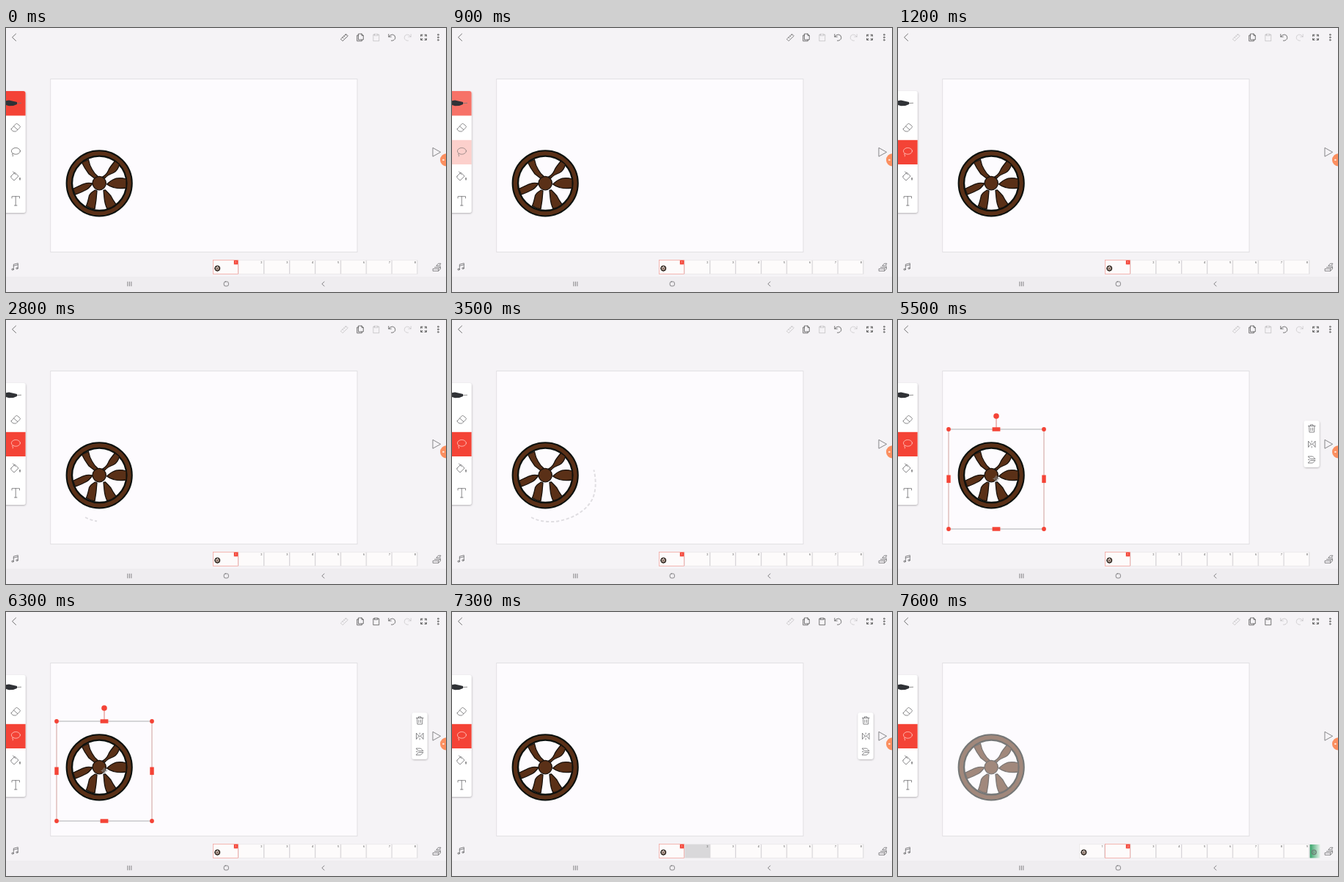
An HTML page for the animation above (8000 ms loop, 600 by 360 pixels).

```html
<!DOCTYPE html>
<html lang="en">
<head>
<meta charset="utf-8">
<title>Lasso tool</title>
<style>
html, body { margin: 0; width: 100%; height: 100%; overflow: hidden; background: #f5f3f6; }
svg { display: block; width: 100vw; height: 100vh; }
text { font: 4px Roboto, Arial, sans-serif; fill: #555; text-anchor: middle; }
.icon { fill: none; stroke: #555; stroke-width: .8; stroke-linejoin: round; stroke-linecap: round; }
.soft { stroke: #6c6c6f; }
.red { fill: #f44336; }
</style>
</head>
<body>
<svg viewBox="0 0 600 360">
  <defs>
    <filter id="shadow" x="-30%" y="-10%" width="160%" height="120%">
      <feDropShadow dx=".4" dy="1" stdDeviation="1.2" flood-opacity=".28"/>
    </filter>
    <linearGradient id="green">
      <stop offset="0" stop-color="#35a368"/>
      <stop offset="1" stop-color="#e6f3ea"/>
    </linearGradient>
    <clipPath id="stripClip"><rect x="240" y="310" width="321.5" height="28"/></clipPath>
    <path id="loop" d="M108 269C117 274 128 275.5 140 275C164 272 184 260 192 243C198 228 196 211 191 196C188 189 185 184 180 178C167 162 150 153 128 152.5C104 153 88 170 79 192C72 213 71 240 82 256C85 260 88 263 92 265"/>
    <mask id="loopMask" maskUnits="userSpaceOnUse" x="60" y="140" width="150" height="150">
      <use id="reveal" href="#loop" fill="none" stroke="#fff" stroke-width="6"/>
    </mask>
    <g id="wheel">
      <circle cx="127.2" cy="211.8" r="40.8" fill="none" stroke="#0c110e" stroke-width="9.6"/>
      <circle cx="127.2" cy="211.8" r="41" fill="none" stroke="#5a3017" stroke-width="5.2"/>
      <g fill="#5a3017" stroke="#17110c" stroke-width="1.3" stroke-linejoin="round">
        <path d="M103.500 183.500L112.500 179.500C113.500 185 115 189 117.500 193C119.500 197 122 200 126 203L121.500 205.500C118 203 115.500 201 113 199C110 195 106 189 103.500 183.500Z"/>
        <path d="M148.500 181.500L154.500 185.800C153.500 191 151 195 146.500 197.500C142 199 138 201 134.500 205L131.500 203C135.500 201 138 198 139.500 194.500C141.500 189.500 145 186 148.500 181.500Z"/>
        <path d="M164 206V218C158 219 152 219 147 217.500C143 216.500 140 215 137.500 213C140 211 142 208.500 145.500 207C151 204 157 204 164 206Z"/>
        <path d="M91.500 219.300C97 216.500 102 214 107 212.300C111 211 114 211 118 212C115.500 215.500 113 218.500 109.500 220.500C105 223 100 225 94.500 227.200Z"/>
        <path d="M121.500 221L124 222C123.500 231 122.500 239 121 247C117 246.500 113 245 109.500 242.500C111.500 238 112.500 233 113.500 228.500C115 225 118 223 121.500 221Z"/>
        <path d="M133 221.500L135.500 221C138 223.500 140.500 226 143 229C145 233 147.500 237 150 240.500C146.500 243.500 142.500 245.500 138 246.500C135.500 242 134.500 237 134 232Z"/>
        <circle cx="127.200" cy="211.600" r="9.200"/>
      </g>
    </g>
  </defs>

  <rect width="600" height="360" fill="#f5f3f6"/>
  <rect x="60.700" y="69.600" width="418.300" height="236" fill="#fdfbfe" stroke="#dfdde1" stroke-width=".9"/>
  <use href="#wheel" id="drawing"/>
  <g id="lasso" mask="url(#loopMask)">
    <use href="#loop" fill="none" stroke="#dfdde1" stroke-width="1.900" stroke-dasharray="4.200 2.800"/>
  </g>

  <g id="selection">
    <path d="M69 149H199M69 285H199" stroke="#a3a6a6" stroke-width=".9"/>
    <path d="M69 149V285M199 149V285" stroke="#cb9590" stroke-width=".9"/>
    <path d="M134 131V148" stroke="#e07a72"/>
    <g class="icon" style="stroke:#8d8d8d;stroke-width:.7">
      <circle cx="134" cy="216.500" r="2.600"/><path d="M129.800 216.500H138.200M134 212.300V220.700"/>
    </g>
    <g class="red" id="handles"></g>
  </g>

  <!-- tool bar -->
  <rect x="-6" y="86" width="32.600" height="166" rx="3" fill="#fff" filter="url(#shadow)"/>
  <path class="red" id="brushOn" d="M0 86H23.600Q26.600 86 26.600 89V119.500H0Z"/>
  <path class="red" id="lassoOn" d="M0 152.800H26.600V186H0Z"/>
  <path d="M0 99.200L4 98.500L15 101V104L10 106L4 106.300L0 105Z" fill="#303236"/>
  <path d="M15 102.600L21 102.300" stroke="#777" stroke-width=".8"/>
  <g class="icon soft">
    <path d="M7.300 137.500L13.500 130.700Q14.500 130 15.500 130.700L19 133.700Q20 134.700 19 135.700L13.500 141H10L7.300 138.800Q6.700 138.200 7.300 137.500ZM10.500 134L15.800 138.700"/>
    <g id="lassoIcon"><ellipse cx="13.400" cy="167.800" rx="6" ry="4.400"/><path d="M9.300 171Q7.800 172 9 173Q10.300 173.800 9.300 175"/></g>
    <path d="M7 202L12 197L17 202L12 207.200Q11 208 10 207.200L7.200 204.500Q6.200 203.300 7 202ZM9.500 195.800L13 200M19 204.300Q17.600 206.800 19 207.400Q20.400 206.800 19 204.300"/>
    <path d="M8 232V229.700H18.500V232M13.200 229.700V242M11.500 242H15"/>
  </g>

  <!-- top bar -->
  <circle id="ripple" cx="483" cy="12.500" r="11" fill="#d3d2d4"/>
  <g class="icon">
    <path d="M13.500 8L8.500 12.700L13.500 17.500"/>
    <path id="ruler" d="M456.700 14.800L463.700 8.200L466.300 10.900L459.300 17.500ZM459 12.700L460.200 14M461 10.800L462.200 12M463 9L464 10"/>
    <path d="M480.800 8H485L487.300 10.300V16H480.800ZM485 8V10.300H487.300M480.800 10H478.700V17.800H485.300V16"/>
    <path id="paste" d="M502.500 9H500.800V17.700H508.700V9H507M502.500 8.300H507V10.300H502.500Z"/>
    <path id="undo" d="M521.800 8.500V12H525.300M522 12Q524 8.500 527.500 9Q531 9.800 530.800 13.500Q530 17.500 525.500 17.300"/>
    <path opacity=".25" d="M552.200 8.500V12H548.700M552 12Q550 8.500 546.500 9Q543 9.800 543.200 13.500Q544 17.500 548.500 17.300"/>
    <path stroke-width="1" d="M568 9.200H565.700V11.300M571 9.200H573.300V11.300M565.700 14.200V16.300H568M573.300 14.200V16.300H571M566 9.500L567.700 11.100M573 9.500L571.300 11.100M566 16L567.700 14.400M573 16L571.300 14.400"/>
    <circle cx="589.300" cy="9.200" r=".9"/><circle cx="589.300" cy="12.800" r=".9"/><circle cx="589.300" cy="16.400" r=".9"/>
  </g>

  <!-- selection actions -->
  <g id="actions">
    <rect x="553.500" y="137.300" width="21" height="63.500" rx="3" fill="#fff" filter="url(#shadow)"/>
    <g class="icon soft">
      <path d="M559.500 144.500H569M562.500 144.500V142.800H566V144.500M560.500 144.500L561 153H567.500L568 144.500M563 147V150.800M565.500 147V150.800"/>
      <path d="M559.500 165.500V173.500L562.800 169.500ZM569 165.500V173.500L565.700 169.500ZM564.200 165V166.500M564.200 168.700V170.200M564.200 172.500V174"/>
      <path d="M559.500 186H565.500L569 189.500H563ZM559.500 195H565.500L569 191.500H563ZM559.500 190.500H561"/>
    </g>
  </g>

  <path class="icon soft" d="M582.300 163.500L592.600 169.300L582.300 175Z"/>
  <circle cx="600.600" cy="179.900" r="8.600" fill="#fb8f60"/>
  <rect x="595" y="178.700" width="2.800" height="2.400" rx="1" fill="#fde0d2"/>

  <!-- timeline -->
  <g class="icon soft">
    <path d="M10.300 329V322.300L16.300 320.800V327.500M10.300 324.300L16.300 322.800"/>
    <ellipse cx="9" cy="329.200" rx="1.300" ry="1"/><ellipse cx="15" cy="327.700" rx="1.300" ry="1"/>
    <path d="M587 324L589.500 321.200H593L590.800 324ZM584.500 326.300H590.300L592.500 324.200M582.500 328.300H589.700V331.300H582.500ZM589.700 328.300L592.500 325.800V328.500L589.700 331.300"/>
  </g>
  <g clip-path="url(#stripClip)">
    <g id="strip"></g>
    <g id="current">
      <rect x="282.500" y="316.500" width="34" height="19" fill="none" stroke="#f7a29b" stroke-width=".7"/>
      <rect class="red" x="310.800" y="316.800" width="5.400" height="5.600"/>
      <text id="badge" x="313.500" y="321" style="fill:#fff"></text>
    </g>
  </g>
  <g id="extra">
    <rect x="561.700" y="317" width="14" height="18.500" fill="url(#green)"/>
    <circle cx="567.300" cy="327.600" r="3" fill="none" stroke="#6f8177" stroke-width="1.300"/>
    <path d="M565.300 326L569.300 329.200M569.300 326L565.300 329.200" stroke="#6f8177" stroke-width=".7"/>
  </g>

  <!-- system bar -->
  <rect y="339" width="600" height="21" fill="#efedf0"/>
  <g class="icon soft">
    <path d="M165.900 346.200V351.800M168.400 346.200V351.800M170.900 346.200V351.800"/>
    <rect x="297.200" y="345.900" width="6.200" height="6" rx="2"/>
    <path d="M434 346L430.800 349L434 352"/>
  </g>
</svg>
<script>
const LOOP = 8000, STEP = 100, PITCH = 34.9;
const NS = 'http://www.w3.org/2000/svg';
const $ = id => document.getElementById(id);
const add = (parent, tag, attrs, label = '') => {
  const el = document.createElementNS(NS, tag);
  for (const key in attrs) el.setAttribute(key, attrs[key]);
  el.textContent = label;
  return parent.appendChild(el);
};
const ramp = (t, from, to) => Math.min(1, Math.max(0, (t - from) / (to - from)));
const mix = (a, b, p) => a + (b - a) * p;
const fade = (id, value) => $(id).setAttribute('opacity', value);

// selection handles
for (const x of [69, 199]) {
  for (const y of [149, 285]) add($('handles'), 'circle', { cx: x, cy: y, r: 2.9 });
  add($('handles'), 'rect', { x: x - 2.7, y: 211.5, width: 5.4, height: 10.6 });
}
for (const y of [149, 285]) add($('handles'), 'rect', { x: 128.6, y: y - 2.7, width: 10.8, height: 5.4 });
add($('handles'), 'circle', { cx: 134, cy: 131, r: 3.8 });

// timeline cells
const PAPER = '#fdfbfb';
const cells = [];
for (let i = 0; i < 9; i++) {
  const x = 282.5 + i * PITCH;
  cells.push(add($('strip'), 'rect', { x, y: 316.8, width: 34, height: 18.6, fill: PAPER, stroke: '#e6e3e5', 'stroke-width': .6 }));
  add($('strip'), 'path', { d: `M${x + 34.3} 316.8v18.6`, stroke: '#cfcdd0', 'stroke-width': .8 });
  add($('strip'), 'text', { x: x + 31, y: 321 }, i + 1);
}
add($('strip'), 'use', { href: '#wheel', transform: 'translate(277.5 309.9) scale(.0845)' });
add($('strip'), 'circle', { cx: 288.3, cy: 327.8, r: 3.3, fill: 'none', stroke: '#1c1712', 'stroke-width': 1 });

const total = $('loop').getTotalLength();

// share of the loop traced when the pen pauses
const PAUSE = .41;

function draw(t) {
  const pick = ramp(t, 800, 1200);
  fade('brushOn', 1 - pick);
  fade('lassoOn', pick);
  fade('ruler', mix(1, .3, pick));
  $('lassoIcon').style.stroke = `rgb(${mix(100, 255, pick)},${mix(100, 205, pick)},${mix(100, 198, pick)})`;

  const traced = PAUSE * ramp(t, 2700, 3600) + (1 - PAUSE) * ramp(t, 3600, 4500);
  $('reveal').setAttribute('stroke-dasharray', `${traced * total} ${total * 2}`);
  fade('lasso', t < 4600 ? 1 : 0);

  fade('selection', t >= 4600 && t < 7200 ? 1 : 0);
  fade('actions', ramp(t, 4500, 5000) * (1 - ramp(t, 7300, 7600)));

  fade('ripple', t >= 6100 ? 1 - ramp(t, 6100, 6300) : 0);
  fade('paste', mix(.3, 1, ramp(t, 6000, 6300)));

  const turn = ramp(t, 7300, 7600);
  const second = t >= 7400;
  fade('undo', mix(1, .3, turn));
  fade('drawing', mix(1, .56, turn));
  fade('extra', turn);
  cells[1].setAttribute('fill', t >= 7200 && !second ? '#d9d8da' : PAPER);
  const slide = -PITCH * turn * (2 - turn);
  $('strip').setAttribute('transform', `translate(${slide})`);
  $('current').setAttribute('transform', `translate(${second ? slide + PITCH : 0})`);
  $('badge').textContent = second ? 2 : 1;
}

function tick() {
  const t = performance.now() % LOOP;
  draw(Math.floor(t / STEP) * STEP);
  requestAnimationFrame(tick);
}
tick();
</script>
</body>
</html>
```
